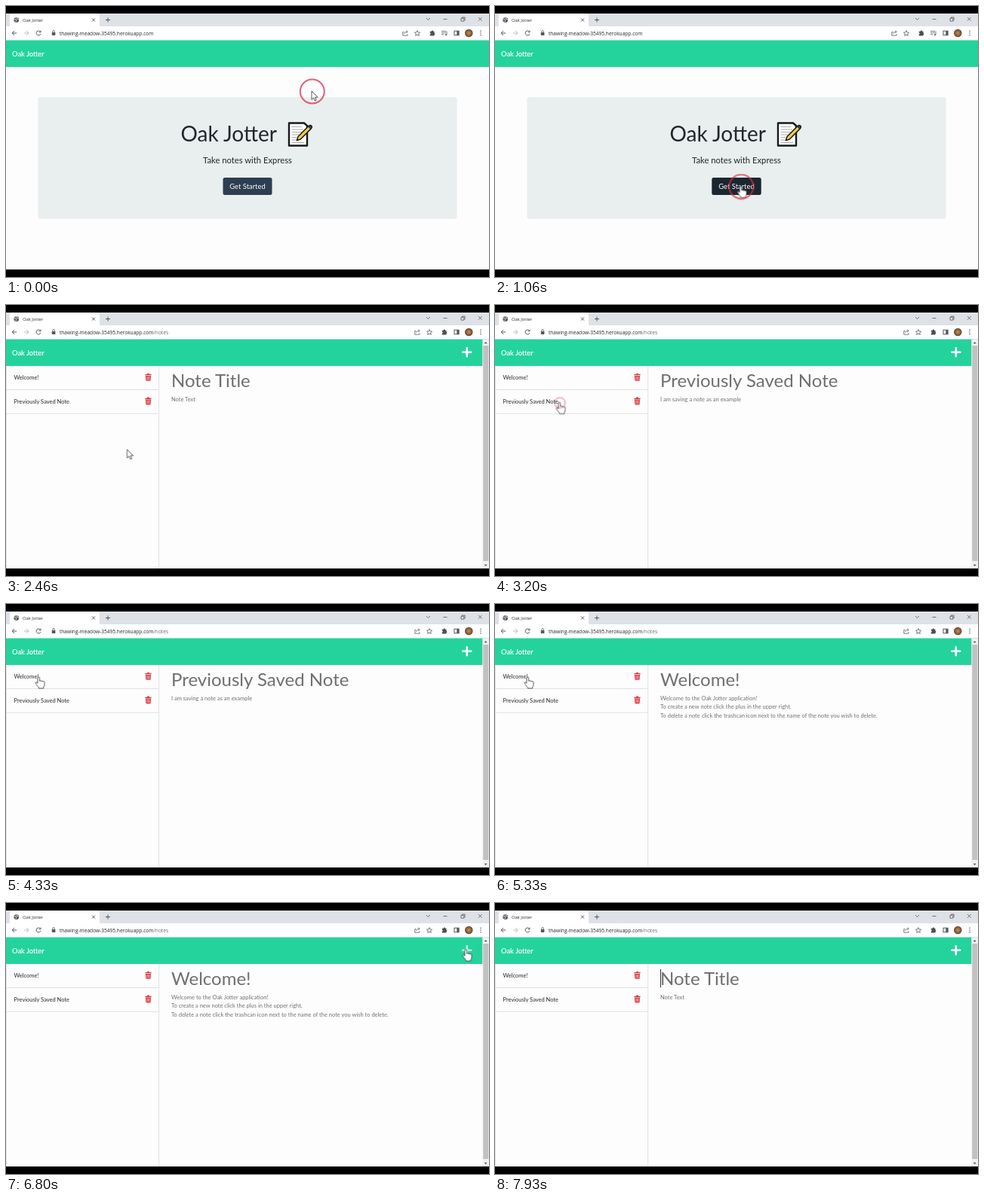
An HTML page that plays this animation: 640 by 360 pixels, repeating every 8000 ms.

```html
<!DOCTYPE html>
<html lang="en">
<head>
<meta charset="utf-8">
<title>Oak Jotter</title>
<style>
html, body { margin: 0; width: 100%; height: 100%; overflow: hidden; background: #000; }
svg { display: block; width: 100vw; height: 100vh; }
text { font-family: Lato, sans-serif; font-size: 7.5px; white-space: pre; }
.ui { font-family: "Open Sans", sans-serif; font-size: 6.6px; fill: #26282b; }
.line { fill: none; stroke: #55585c; stroke-width: 1; }
.thin { stroke-width: .8; }
.brand { font-size: 9.4px; fill: #fff; stroke: #fff; stroke-width: .15; }
.title { font-size: 24px; fill: #706e6e; }
.body text { fill: #6f7072; }
.item { fill: #24292d; }
.rule { stroke: #dfe1e3; stroke-width: 1; }
.pointer path { stroke: #2d3036; stroke-width: .8; fill: #fff; stroke-linejoin: round; }
</style>
</head>
<body>
<svg viewBox="0 0 640 360">
  <defs>
    <radialGradient id="face"><stop stop-color="#c49058"/><stop offset="1" stop-color="#68452b"/></radialGradient>
    <g id="trash" fill="#dc3b43">
      <path d="M0 1.3H2.3L3 .2H5.4L6.1 1.3H8.4V2.5H0Z"/>
      <path d="M.6 3.1H7.8L7.4 9.2Q7.3 10 6.5 10H1.9Q1.1 10 1 9.2Z"/>
      <path d="M2.5 4.3V8.8M4.2 4.3V8.8M5.9 4.3V8.8" stroke="#fff" stroke-width=".55"/>
    </g>
    <g id="share" class="line thin">
      <path d="M-1.5 -1.5H-3.2V3.2H3V1.2M-1.3 1C-1 -1 .4 -1.7 2.7 -1.7M1.3 -3.4L3.2 -1.7L1.3 0"/>
    </g>
    <path id="star" class="line thin" d="M0 -3.6L1.1 -1.2 3.6 -1 1.7 .7 2.3 3.2 0 1.9 -2.3 3.2 -1.7 .7 -3.6 -1 -1.1 -1.2Z"/>
    <path id="puzzle" fill="#4b4e52" d="M-3.2 -2H-1.3A1.2 1.2 0 0 1 1.1 -2H2.5V0A1.2 1.2 0 0 1 2.5 2.3V3.6H-3.2V1.8A1 1 0 0 0 -3.2 -.2Z"/>
  </defs>

  <rect y="10" width="640" height="340" fill="#fdfdfd"/>

  <!-- browser frame -->
  <rect y="10" width="640" height="18" fill="#dee1e6"/>
  <path d="M2 28Q5 28 5 25V13Q5 10 8 10H121Q124 10 124 13V25Q124 28 127 28Z" fill="#fff"/>
  <rect y="27" width="640" height="18.5" fill="#fff"/>
  <circle cx="13.8" cy="18.6" r="3.4" fill="#54575b"/>
  <path d="M11 18L13 17.2 14 18.6 13 20 13.4 21.4M14.5 15.8L14.7 17 16.8 18.3" stroke="#fff" stroke-width=".8" fill="none"/>
  <text class="ui" x="22" y="20.8" style="font-size:5.8px">Oak Jotter</text>
  <path class="line" d="M114 16.5l4 4m0 -4l-4 4M132 18.5h6m-3 -3v6"/>
  <path class="line thin" d="M557 16l2.5 2.5 2.5 -2.5M579.5 17.5h5M603 16.3h3.8v3.8h-3.8zM604.3 16.3v-1.3h3.8v3.8h-1.3M626 15l4.6 4.6m0 -4.6l-4.6 4.6"/>
  <path class="line" d="M14.2 36H8.2m2.9 -3L8.2 36l2.9 3"/>
  <path class="line" d="M24 36h6m-2.9 -3L30 36l-2.9 3" style="stroke:#b8babd"/>
  <path class="line" d="M45.6 34.2A3 3 0 1 0 46 37M46 32.6v2.2h-2.2"/>
  <rect x="60.8" y="35" width="4.6" height="4" rx=".5" fill="#55585c"/>
  <path class="line thin" d="M61.8 35v-1.2a1.3 1.3 0 0 1 2.6 0V35"/>
  <text class="ui" x="71" y="38.6">thawing-meadow-35495.herokuapp.com<tspan id="path" fill="#686b70">/notes</tspan></text>
  <g id="toolsWide">
    <use href="#share" x="529" y="36"/><use href="#star" x="545" y="36.2"/><use href="#puzzle" x="565" y="35.8"/>
    <path class="line thin" d="M577 33.5h6M577 35.7h6M577 37.9h3M584 33.5v4.8"/><circle cx="583" cy="38.3" r="1" fill="#55585c"/>
  </g>
  <g id="toolsNarrow">
    <use href="#share" x="545" y="36"/><use href="#star" x="561" y="36.2"/><use href="#puzzle" x="581" y="35.8"/>
  </g>
  <rect class="line" x="594" y="33.2" width="6" height="5.6"/><rect x="597.3" y="33" width="3" height="6" fill="#55585c"/>
  <circle cx="613.3" cy="36" r="5.3" fill="url(#face)"/>
  <g fill="#55585c"><circle cx="629" cy="33.3" r=".8"/><circle cx="629" cy="36" r=".8"/><circle cx="629" cy="38.7" r=".8"/></g>

  <rect y="45.5" width="640" height="35.5" fill="#24d39b"/>
  <text class="brand" x="8" y="66.8">Oak Jotter</text>

  <g id="home">
    <rect x="42.5" y="121.3" width="555" height="161.5" rx="2.5" fill="#e9eeee"/>
    <text x="231.5" y="180" style="font-size:28px" fill="#20282c">Oak Jotter</text>
    <g stroke="#17191b" stroke-linejoin="round">
      <path d="M375 155.5H395L399 159V185.5H375Z" fill="#fff" stroke-width="2.4"/>
      <path d="M378.5 160.5H392M378.5 164H394M378.5 167.5H392M378.5 171H388M378.5 174.5H385M378.5 178H384M378.5 181.5H395" stroke="#a9adb0" stroke-width="1.1"/>
      <path d="M385.3 178.6L387 173.5 400.4 160Q403 157.4 404.8 159.3 406.2 161 403.8 163.4L390.3 177Z" fill="#f6c849" stroke-width="1.5"/>
      <path d="M400.4 160Q403 157.4 404.8 159.3 406.2 161 403.8 163.4Z" fill="#444" stroke-width="1"/>
    </g>
    <text x="320" y="209.2" text-anchor="middle" style="font-size:11.25px" fill="#20282c">Take notes with Express</text>
    <rect x="287.5" y="228" width="65" height="23" rx="2.5" fill="#2c3e50"/>
    <rect id="hover" x="287.5" y="228" width="65" height="23" rx="2.5" fill="#1b2730"/>
    <text x="320" y="243.2" text-anchor="middle" style="font-size:9.4px" fill="#fff">Get Started</text>
  </g>

  <g id="notes">
    <path class="rule" d="M.5 81V350M202.7 81V350"/>
    <rect x="631.3" y="45.5" width="8.7" height="304.5" fill="#f1f1f1"/>
    <rect x="632.3" y="54" width="7" height="286" fill="#c1c1c1"/>
    <path d="M633.7 51.2l2 -2.2 2 2.2zM633.7 344.8l2 2.2 2 -2.2z" fill="#505050"/>
    <path id="plus" d="M610.8 57.3V68.3M605.3 62.8H616.3" stroke="#fff" stroke-width="2.6" stroke-linecap="round"/>
    <g id="list">
      <path class="rule" d="M1 112.5H202M1 144.3H202"/>
      <text class="item" x="10.5" y="99.2">Welcome!</text><use href="#trash" x="184.3" y="90.8"/>
      <text class="item" x="10.5" y="130.8">Previously Saved Note</text><use href="#trash" x="184.3" y="122.4"/>
    </g>
    <g id="blank" class="body">
      <text class="title" x="219" y="109.3" style="fill:#706e6e">Note Title</text>
      <text x="219" y="128.2">Note Text</text>
    </g>
    <g id="saved" class="body">
      <text class="title" x="219" y="109.3">Previously Saved Note</text>
      <text x="219" y="128.2">I am saving a note as an example</text>
    </g>
    <g id="welcome" class="body">
      <text class="title" x="219" y="109.3">Welcome!</text>
      <text x="219" y="128.2">Welcome to the Oak Jotter application!</text>
      <text x="219" y="139.4">To create a new note click the plus in the upper right.</text>
      <text x="219" y="150.6">To delete a note click the trashcan icon next to the name of the note you wish to delete.</text>
    </g>
    <path id="caret" d="M219.5 88V112.3" stroke="#333" stroke-width="1"/>
  </g>

  <g id="cursor" class="pointer">
    <path id="arrow" d="M0 0V11.3L2.6 8.9 4.4 12.9 6.2 12.1 4.5 8.2H8.1Z"/>
    <path id="hand" d="M-1.3 1.2a1.3 1.3 0 0 1 2.6 0V5.4a1.2 1.2 0 0 1 2.3 .4a1.2 1.2 0 0 1 2.2 .5a1.1 1.1 0 0 1 2 .8V11L6.5 13.5V15H.1V13.8L-2.6 10.5-4 8.2C-4.6 7 -3.2 6.2 -2.3 7.2L-1.3 8.3Z"/>
    <path id="beam" style="fill:none" d="M-2 -6H2M0 -6V6M-2 6H2"/>
    <circle id="ring" cx=".8" cy=".5" fill="none" stroke="#d82d48" stroke-opacity=".75" stroke-width="2"/>
  </g>

  <path d="M0 0H640V10H0ZM0 350H640V360H0Z"/>
</svg>
<script>
const LOOP = 8000;
const el = id => document.getElementById(id);
const epoch = document.timeline.currentTime ?? 0;

function play(id, frames) {
  const animation = el(id).animate(
    frames.map(({ at, ...rest }) => ({ ...rest, offset: at / LOOP })),
    { duration: LOOP, iterations: Infinity });
  animation.startTime = epoch;
}

// Hard on/off switching over [from, to] spans.
function show(id, spans, on = 1, off = 0) {
  const frames = [];
  const add = (at, opacity) => frames.push({ at, opacity, easing: "step-end" });
  if (spans[0][0] > 0) add(0, off);
  for (const [from, to] of spans) {
    add(from, on);
    if (to < LOOP) add(to, off);
  }
  add(LOOP, spans.at(-1)[1] < LOOP ? off : on);
  play(id, frames);
}

const visible = {
  home: [[0, 1330]],
  hover: [[700, 1330]],
  notes: [[1330, LOOP]],
  path: [[1330, LOOP]],
  toolsWide: [[0, 1900]],
  toolsNarrow: [[1900, LOOP]],
  list: [[1660, LOOP]],
  blank: [[1330, 3070], [7130, LOOP]],
  saved: [[3070, 4530]],
  welcome: [[4530, 7130]],
  caret: [[7750, LOOP]],
  arrow: [[0, 700], [2400, 2880], [6450, 6630], [7230, 7400]],
  hand: [[700, 2000], [2880, 5720], [6630, 7230]],
  beam: [[2000, 2400], [5720, 6450], [7400, 7800]],
};
for (const [id, spans] of Object.entries(visible)) show(id, spans);
show("plus", [[6630, 7230]], .7, 1);

const route = [
  [0, 405, 113], [200, 405, 113], [800, 325.5, 239.5], [1900, 325.5, 239.5],
  [2630, 140, 186], [3000, 85.3, 129.5], [3600, 85.3, 129.5], [4150, 43.2, 97],
  [5450, 43.2, 97], [6700, 609.3, 62], [7180, 609.3, 62], [7620, 290, 101], [LOOP, 290, 101],
];
play("cursor", route.map(([at, x, y]) =>
  ({ at, transform: `translate(${x}px, ${y}px)`, easing: "ease-in-out" })));

// The ring opens on press and closes after release.
const presses = [[930, 1130], [2870, 3070], [4400, 4530], [6950, 7100], [7600, 7680]];
const ring = [[0, 16], [60, 16], [290, 0]];
for (const [down, up] of presses) ring.push([down - 70, 0], [down, 16], [up, 16], [Math.min(up + 230, 7800), 0]);
ring.push([LOOP, 0]);
play("ring", ring.map(([at, r]) => ({ at, r: `${r}px`, strokeOpacity: r ? .75 : 0 })));
</script>
</body>
</html>
```
